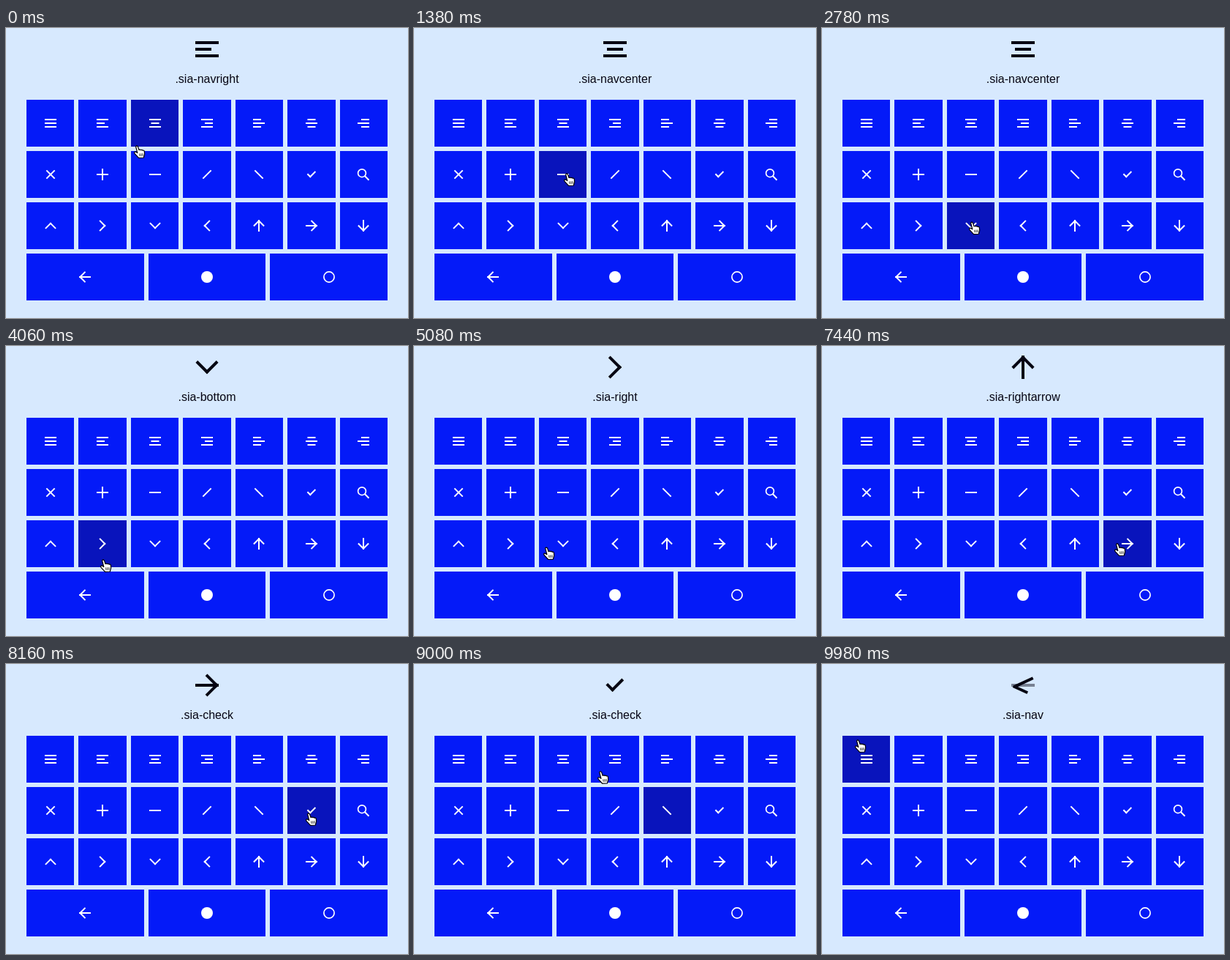
Write an HTML page with a canvas that moves like this. It is 550 px wide and 396 px high and loops after 10 s.

```html
<!DOCTYPE html>
<html lang="en">
<head>
<meta charset="utf-8">
<title>Icon morphs</title>
<style>
html, body { margin: 0; width: 550px; height: 396px; overflow: hidden; background: #d7e9fe; }
canvas { display: block; }
</style>
</head>
<body>
<canvas width="550" height="396"></canvas>
<script>
const ctx = document.querySelector('canvas').getContext('2d');
const LOOP = 10000, DELAY = 60, MORPH = 300, HOVER_LAG = 70;
const INK = '#060512', BLUE = '#041af8', DARK = '#0914bc';

// A bar is [x, y, length, degrees, opacity] on a 32-unit icon.
const NONE = [0, 0, 32, 0, 0];
const bar = (x, y, len, deg) => [x, y, len, deg, 1];
const menu = (widths, align, gap = 10) =>
  widths.map((w, i) => bar(align * (32 - w) / 2, (i - 1) * gap, w, 0));
const turn = (bars, deg) => {
  const c = Math.cos(deg * Math.PI / 180), s = Math.sin(deg * Math.PI / 180);
  return bars.map(([x, y, len, a, o]) => [x * c - y * s, x * s + y * c, len, a + deg, o]);
};

const chevron = [bar(0, -6.4, 22, 45), NONE, bar(0, 6.4, 22, -45)];
const arrow = [bar(6.8, -6.4, 22, 45), bar(0, 0, 32, 0), bar(6.8, 6.4, 22, -45)];
const check = [bar(3, -0.2, 22, -45), NONE, bar(-6.6, 3, 13, 45)];
const line = deg => [bar(0, 0, 32, deg)];
const cross = deg => [bar(0, 0, 32, deg), bar(0, 0, 32, deg + 90)];
const FULL = [32, 32, 32], WAIST = [32, 22, 32], WIDE = [22, 32, 22];

const glyphs = [
  menu(FULL, 0), menu(WAIST, -1), menu(WAIST, 0), menu(WAIST, 1),
  menu(WIDE, -1), menu(WIDE, 0), menu(WIDE, 1),
  cross(45), cross(0), line(0), line(-45), line(45), check, 'search',
  turn(chevron, -90), chevron, turn(chevron, 90), turn(chevron, 180),
  turn(arrow, -90), arrow, turn(arrow, 90),
  turn(arrow, 180), 'disc', 'ring'
];

const tiles = glyphs.map((glyph, i) => {
  const cols = i < 21 ? 7 : 3, col = i < 21 ? i % 7 : i - 21;
  const w = (494 - 6 * (cols - 1)) / cols, left = 28 + col * (w + 6);
  const x = Math.round(left);
  return { glyph, x, y: 98 + 70 * Math.floor(i / 7), w: Math.round(left + w) - x, cx: Math.round(left + w / 2) };
});

// Clicks: [time, label, icon]
const clicks = [
  [-1000, 'navright', menu(WAIST, -1, 9)],
  [980, 'navcenter', menu(WAIST, 0, 9)],
  [2900, 'bottom', turn(chevron, 90)],
  [4480, 'right', chevron],
  [6140, 'toparrow', turn(arrow, -90)],
  [7420, 'rightarrow', arrow],
  [8100, 'check', check],
  [9500, 'nav', menu(FULL, 0, 9)]
];

// Pointer tip: [time, x, y, linear]
const path = [
  [0, 179, 161], [500, 200, 135], [1050, 200, 135], [1380, 209, 199],
  [1480, 209, 201], [1900, 205, 264], [3400, 205, 266], [4060, 133, 292],
  [4350, 132, 272], [4800, 132, 272], [5060, 176, 275, 1], [5750, 342, 279, 1],
  [6950, 342, 279], [7400, 404, 270], [7620, 404, 270], [8020, 414, 204],
  [8580, 414, 204], [8720, 256, 147, 1], [8960, 49, 104, 1], [LOOP, 49, 104]
];

const clamp = (v, lo, hi) => Math.min(hi, Math.max(lo, v));
const smooth = u => u * u * (3 - 2 * u);
const mix = (a, b, u) => a + (b - a) * u;

function pointer(t) {
  t = clamp(t, 0, LOOP - 1);
  const i = path.findIndex(k => k[0] > t), a = path[i - 1], b = path[i];
  const u = (t - a[0]) / (b[0] - a[0]), e = b[3] ? u : smooth(u);
  return [mix(a[1], b[1], e), mix(a[2], b[2], e)];
}

function morph(from, to, u) {
  return from.map((a, i) => a.map((v, k) => {
    const b = to[i][k];
    if (k !== 3) return mix(v, b, u);
    const d = (((b - v + 90) % 180) + 180) % 180 - 90; // bars look alike after a half turn
    return v + d * u;
  }));
}

function drawBars(bars, cx, cy, scale, color) {
  ctx.fillStyle = color;
  for (const [x, y, len, deg, alpha] of bars) {
    if (!alpha) continue;
    ctx.save();
    ctx.translate(cx, cy);
    ctx.scale(scale, scale);
    ctx.translate(x, y);
    ctx.rotate(deg * Math.PI / 180);
    ctx.globalAlpha = alpha;
    ctx.fillRect(-len / 2, -2, len, 4);
    ctx.restore();
  }
}

function circle(x, y, r, filled) {
  ctx.beginPath();
  ctx.arc(x, y, r, 0, 7);
  filled ? ctx.fill() : ctx.stroke();
}

function drawGlyph(glyph, x, y) {
  if (Array.isArray(glyph)) return drawBars(glyph, x, y, 0.5, '#fff');
  ctx.fillStyle = ctx.strokeStyle = '#fff';
  ctx.lineWidth = 1.7;
  if (glyph === 'disc') circle(x, y, 8, true);
  if (glyph === 'ring') circle(x, y, 7.1);
  if (glyph === 'search') {
    circle(x - 2, y - 1.8, 5.4);
    ctx.lineWidth = 2;
    ctx.beginPath();
    ctx.moveTo(x + 2, y + 2.2);
    ctx.lineTo(x + 7.5, y + 7.7);
    ctx.stroke();
  }
}

const hand = new Path2D('M-1.4 1Q-.2 -1 1.4 .8L3 5.6Q4.4 4.4 5.6 5.7Q7 4.8 8 6.2Q9.8 5.6 10.3 7.4' +
  'L10.6 11L9.3 16L2.6 16.4L-2.8 10.6Q-4 8.8 -2.8 8Q-1.4 7.6 .8 9.6Z');
const knuckles = new Path2D('M3.6 10.5L4 14M5.8 10.3L6 14M8 10.2L8 13.8');

function drawHand(x, y) {
  ctx.save();
  ctx.translate(x, y);
  ctx.lineJoin = 'round';
  ctx.lineWidth = 1.2;
  ctx.fillStyle = '#fff';
  ctx.strokeStyle = '#000';
  ctx.fill(hand);
  ctx.stroke(hand);
  ctx.lineWidth = 0.8;
  ctx.stroke(knuckles);
  ctx.restore();
}

function draw(time) {
  // Everything stands still for 280 ms after 8260.
  const t = time - clamp(time - 8260, 0, 280);
  ctx.fillStyle = '#d7e9fe';
  ctx.fillRect(0, 0, 550, 396);

  const [hx, hy] = pointer(t - HOVER_LAG);
  for (const { glyph, x, y, w, cx } of tiles) {
    const over = hx >= x && hx < x + w && hy >= y && hy < y + 64;
    ctx.fillStyle = over ? DARK : BLUE;
    ctx.fillRect(x, y, w, 64);
    drawGlyph(glyph, cx, y + 32);
  }

  const n = clicks.filter(c => c[0] <= t).length - 1;
  const [start, label, icon] = clicks[n];
  const u = smooth(clamp((t - start - DELAY) / MORPH, 0, 1));
  drawBars(morph(clicks[Math.max(0, n - 1)][2], icon, u), 275, 29, 1, INK);

  ctx.fillStyle = INK;
  ctx.font = '16px "Liberation Sans", Arial, sans-serif';
  ctx.textAlign = 'center';
  ctx.fillText('.sia-' + label, 275, 75);

  drawHand(...pointer(t));
}

const began = performance.now();
function tick() {
  draw((performance.now() - began) % LOOP);
  requestAnimationFrame(tick);
}
tick();
</script>
</body>
</html>
```
